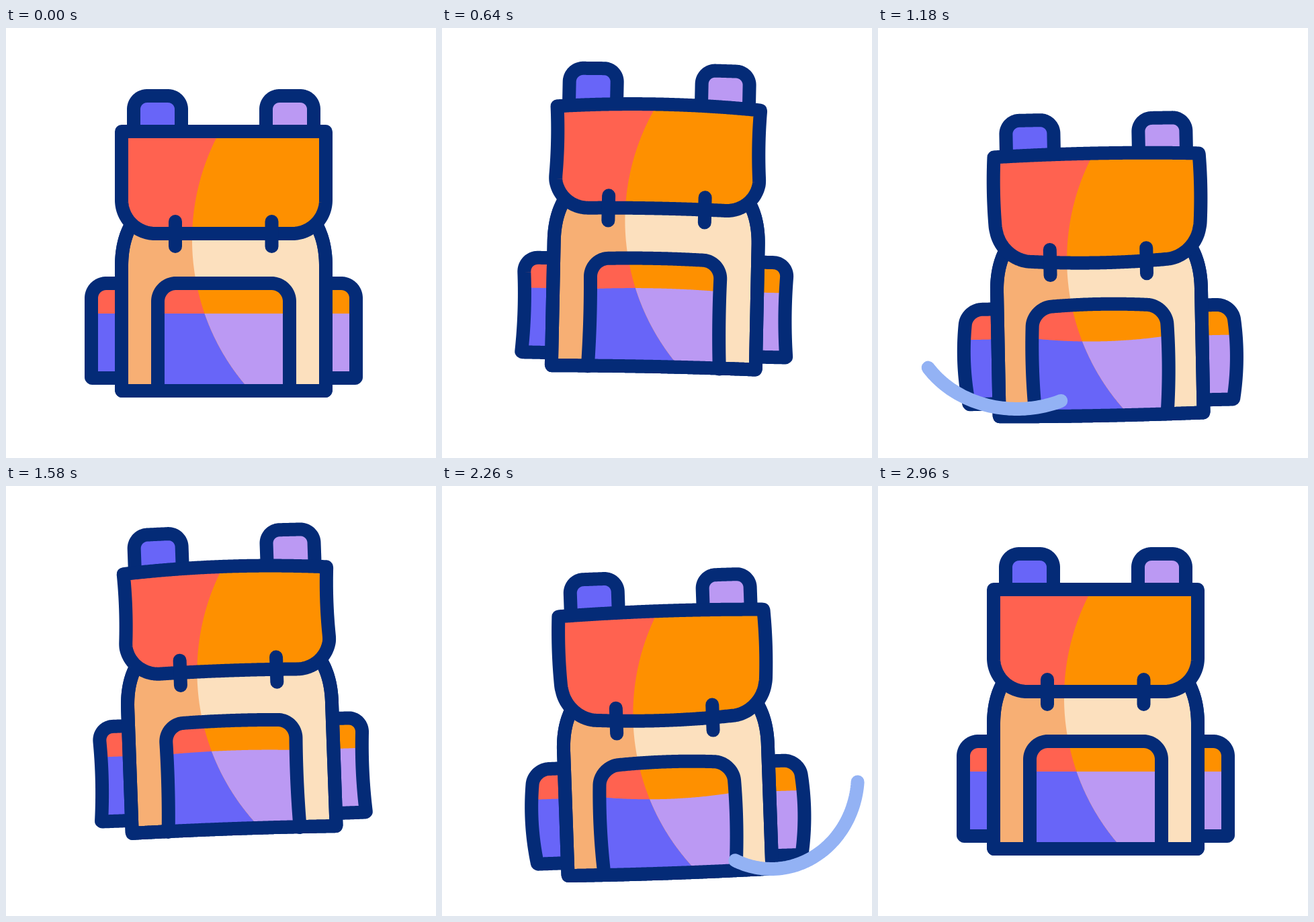
Write an HTML page with a canvas that moves like this. It is 640 by 640 pixels and loops after 3.34 s.

```html
<!DOCTYPE html>
<html lang="en">
<head>
<meta charset="utf-8">
<title>Backpack</title>
<style>
  html, body { margin: 0; width: 100%; height: 100%; overflow: hidden; background: #fff; }
  canvas { display: block; width: 640px; height: 640px; }
</style>
</head>
<body>
<canvas id="stage" width="640" height="640"></canvas>
<script>
const ctx = document.getElementById('stage').getContext('2d');
const LOOP = 3340, CENTER = 324, PIVOT_Y = 100, LINE = 20;
const NAVY = '#042b77', RED = '#ff6250', ORANGE = '#fe9000', VIOLET = '#6865f8',
      LILAC = '#bb99f3', PEACH = '#f7af74', CREAM = '#fce0be', BLUE = '#93b2f4';

// Keyframes as [ms, value], eased in and out between neighbours.
const LIFT = [[200, 0], [640, -34.5], [1190, 35.5], [1675, -34.5], [2230, 35.5], [2650, 0]];
const LEAN = [[440, 0], [900, .052], [1400, -.068], [1920, .052], [2445, -.068], [2960, 0]];
const FLEX = [[200, 0], [580, 1], [860, 1], [1130, -1], [1270, -1],
              [1560, 1], [1900, 1], [2170, -1], [2310, -1], [2650, 0]];

const clamp = (v, lo, hi) => Math.min(hi, Math.max(lo, v));
const mix = (a, b, k) => a + (b - a) * k;
const ease = k => (1 - Math.cos(Math.PI * clamp(k, 0, 1))) / 2;
const hump = v => Math.max(0, 1 - v * v);

function track(keys, t) {
  if (t <= keys[0][0]) return keys[0][1];
  for (let i = 1; i < keys.length; i++) {
    const [t0, a] = keys[i - 1], [t1, b] = keys[i];
    if (t < t1) return mix(a, b, ease((t - t0) / (t1 - t0)));
  }
  return keys[keys.length - 1][1];
}

// How each part bends: vertical bow [rising, falling] at its top and bottom edge,
// and sideways bulge [rising, falling] around a middle height.
const NONE = [0, 0];
const FLAP = { half: 152, y0: 154, y1: 306, top: [-6, -3], bottom: [-3, 8],
               bulge: [-2.3, 2.2], mid: 205, reach: 60 };
const STRAP = { ...FLAP, half: 300, top: [-5, -1], bulge: NONE };
const BODY = { half: 152, y0: 300, y1: 540, top: NONE, bottom: [-1.5, 1.5],
               bulge: NONE, mid: 420, reach: 120 };
const FRONT = { half: 98, y0: 380, y1: 540, top: [-2.5, -4.5], bottom: NONE,
                bulge: [-2, 3.5], mid: 455, reach: 85 };
const SIDE = { half: 197, y0: 380, y1: 521, top: NONE, bottom: NONE,
               bulge: [-3, 6], mid: 450, reach: 70 };
const BAND = { ...SIDE, half: 98, top: [-3, 6], bottom: [-3, 6], bulge: NONE };
const STIFF = { ...SIDE, bulge: NONE };

function sample(d) {
  const path = document.createElementNS('http://www.w3.org/2000/svg', 'path');
  path.setAttribute('d', d);
  const length = path.getTotalLength(), count = Math.ceil(length / 2);
  return Array.from({ length: count + 1 }, (_, i) => {
    const p = path.getPointAtLength(length * i / count);
    return [p.x, p.y];
  });
}

const shape = (d, bend) => ({ points: sample(d), closed: /z$/i.test(d), bend });
const part = (d, bend, ...fills) => ({ ...shape(d, bend), fills });
const strapPath = x => `M${x},154 V121 a20,20 0 0 1 20,-20 h31 a20,20 0 0 1 20,20 V154`;

// Fills: dark side, light side, then the same two below the band line.
const parts = [
  part('M172,521 H127 V402 a22,22 0 0 1 22,-22 H172', SIDE, RED, RED, VIOLET, VIOLET),
  part('M476,521 H521 V402 a22,22 0 0 0 -22,-22 H476', SIDE, ORANGE, ORANGE, LILAC, LILAC),
  part('M185,295 C176,312 172,332 172,355 V540 H476 V355 C476,332 472,312 463,295', BODY, PEACH, CREAM),
  part('M226,540 V407 a27,27 0 0 1 27,-27 H395 a27,27 0 0 1 27,27 V540', FRONT, RED, ORANGE, VIOLET, LILAC),
  part(strapPath(190), STRAP, VIOLET, VIOLET),
  part(strapPath(387), STRAP, LILAC, LILAC),
  part('M172,154 H476 V256 a50,50 0 0 1 -50,50 H222 a50,50 0 0 1 -50,-50 Z', FLAP, RED, ORANGE),
  part('M252,288 V325', FLAP),
  part('M395.5,288 V325', FLAP)
];
const baseline = parts[2];
const lightSide = shape('M326.3,140 A335,335 0 0 0 373.3,550 H600 V140 Z', STIFF);
const belowBand = shape('M100,425 H548 V560 H100 Z', BAND);

function poseAt(t) {
  const flex = track(FLEX, t), lean = track(LEAN, t), lift = track(LIFT, t);
  const pick = ([rising, falling]) => flex > 0 ? rising * flex : -falling * flex;
  const sin = Math.sin(lean), cos = Math.cos(lean);

  return ({ points, closed, bend }) => {
    const top = pick(bend.top), bottom = pick(bend.bottom), bulge = pick(bend.bulge);
    const path = new Path2D();
    for (const [x, y] of points) {
      const u = clamp((x - CENTER) / bend.half, -1, 1);
      const k = clamp((y - bend.y0) / (bend.y1 - bend.y0), 0, 1);
      const dx = x - CENTER + bulge * u * hump((y - bend.mid) / bend.reach);
      const dy = y - PIVOT_Y + mix(top, bottom, k) * hump(u);
      path.lineTo(CENTER + dx * cos - dy * sin, PIVOT_Y + lift + dx * sin + dy * cos);
    }
    if (closed) path.closePath();
    return path;
  };
}

function fillPart(outline, [dark, light, darkLow, lightLow], lightPath, lowPath) {
  const paint = (upper, lower) => {
    ctx.fillStyle = upper;
    ctx.fill(outline);
    if (!lower) return;
    ctx.fillStyle = lower;
    ctx.fill(lowPath);
  };
  ctx.save();
  ctx.clip(outline);
  paint(dark, darkLow);
  if (light !== dark) {
    ctx.clip(lightPath);
    paint(light, lightLow);
  }
  ctx.restore();
}

// An arc that sweeps from the side to underneath the pack; dir is 1 for the right one.
function swoosh(t, cx, cy, rx, ry, dir) {
  if (t <= 690 || t >= 1310) return;
  const angle = k => mix(-6.8, 114.6, k) * Math.PI / 180;
  const head = angle(Math.sin(Math.PI / 2 * clamp((t - 690) / 380, 0, 1)));
  const tail = angle(ease((t - 1100) / 210));
  ctx.beginPath();
  for (let i = 0; i <= 60; i++) {
    const a = mix(tail, head, i / 60);
    ctx.lineTo(cx + dir * rx * Math.cos(a), cy + ry * Math.sin(a));
  }
  ctx.strokeStyle = BLUE;
  ctx.stroke();
}

function draw(t) {
  ctx.fillStyle = '#fff';
  ctx.fillRect(0, 0, 640, 640);
  ctx.lineWidth = LINE;
  ctx.lineCap = ctx.lineJoin = 'round';

  const pose = poseAt(t);
  const lightPath = pose(lightSide), lowPath = pose(belowBand);
  for (const item of parts) {
    const outline = pose(item);
    if (item.fills.length) fillPart(outline, item.fills, lightPath, lowPath);
    ctx.strokeStyle = NAVY;
    ctx.stroke(outline);
    // The body's bottom edge stays closed over the front pocket.
    if (item.bend === FRONT) ctx.stroke(pose(baseline));
  }

  swoosh(t, 207, 434, 157, 133, -1);
  swoosh(t - 1120, 490, 430, 129, 140, 1);
}

const start = performance.now();
function tick() {
  draw((performance.now() - start) % LOOP);
  requestAnimationFrame(tick);
}
tick();
</script>
</body>
</html>
```
